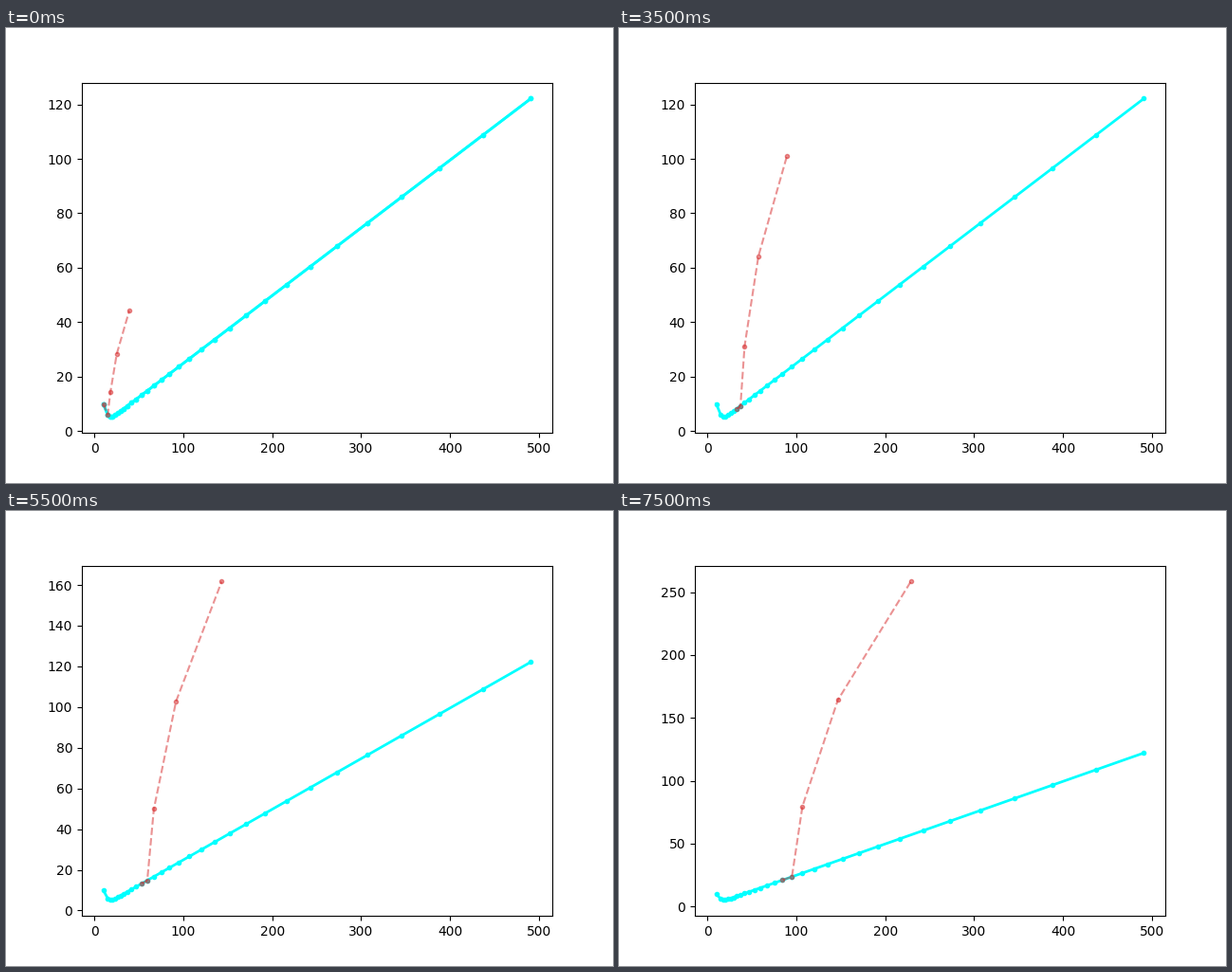
A matplotlib script that plays this animation: 640 by 480 pixels, repeating every 8 s.

```python
import numpy as np
import matplotlib.pyplot as plt
from matplotlib.animation import FuncAnimation

STEPS = 30
FRAMES = 16
DT = 0.5

# Velocity gains: the first drives the real motion, the rest look ahead.
GAIN = np.array([0.1737, 0.4263])
AHEAD = np.array([[0.652, 0.747], [1.467, 1.045], [2.338, 1.528]])


def step(state, velocity):
    return np.array([state[0] + DT * state[1], velocity])


def simulate(start):
    path = [np.array(start)]
    for _ in range(STEPS):
        path.append(step(path[-1], GAIN @ path[-1]))
    return np.array(path)


def forecast(n):
    """Two points of the real path followed by three predicted ones."""
    points = [path[n], path[n + 1]]
    for velocity in AHEAD @ path[n + 1]:
        points.append(step(points[-1], velocity))
    return np.array(points)


path = simulate((10.0, 10.0))
low, high = path[:, 1].min(), path[:, 1].max()

fig, ax = plt.subplots(figsize=(6.4, 4.8), dpi=100)
ax.plot(*path.T, ".-", color="cyan", lw=2)
overlay, = ax.plot(*path.T, ".-", color="cyan", lw=2)
plan, = ax.plot([], [], ".--", color="tab:red", alpha=0.5)

pad = 0.05 * np.ptp(path[:, 0])
ax.set_xlim(path[:, 0].min() - pad, path[:, 0].max() + pad)


def update(n):
    points = forecast(n)
    plan.set_data(*points.T)
    overlay.set_visible(n == 0)
    top = max(high, points[:, 1].max())
    margin = 0.05 * (top - low)
    ax.set_ylim(low - margin, top + margin)
    return plan, overlay


anim = FuncAnimation(fig, update, frames=FRAMES, interval=500,
                     repeat=True, repeat_delay=0, blit=False)
plt.show()
```
